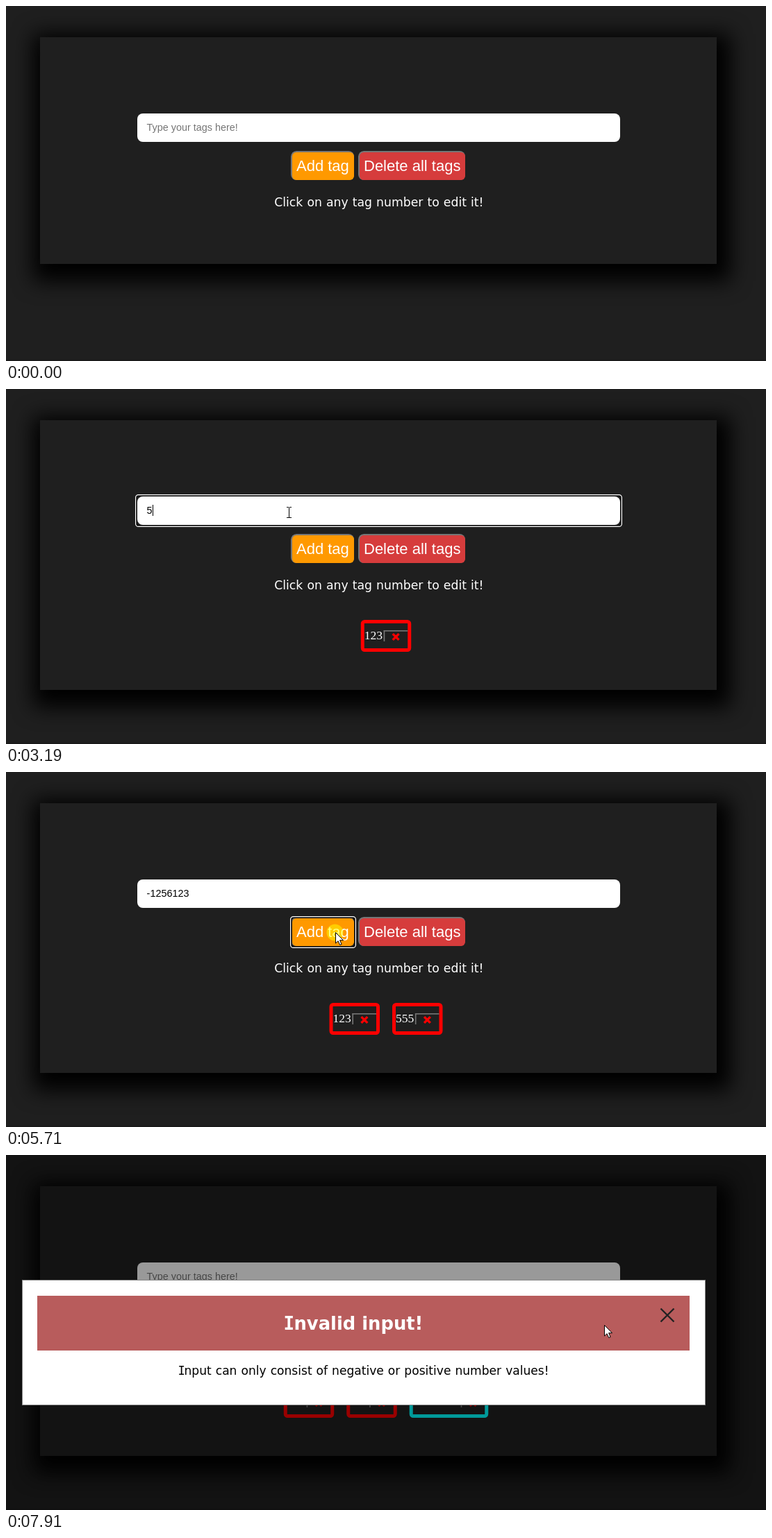
Animation of 1094x512 px, one loop 7990 ms. Source, as an HTML page with a canvas:

```html
<!DOCTYPE html>
<html lang="en">
<head>
<meta charset="utf-8">
<title>Tag input</title>
<style>
  html, body { margin: 0; width: 100%; height: 100%; overflow: hidden; background: #1f1f1f; }
  canvas { display: block; }
</style>
</head>
<body>
<canvas id="stage" width="1094" height="512"></canvas>
<script>
const ctx = document.getElementById('stage').getContext('2d');
const LOOP = 7990, STEP = 80;
const BG = '#1f1f1f', GREY = '#767676';
const SANS = '"Liberation Sans", Arial, sans-serif';
const WIDE = '"DejaVu Sans", Verdana, sans-serif';
const MONO = '"DejaVu Sans Mono", monospace';
const SERIF = '"Liberation Serif", "Times New Roman", serif';

// Timeline: [start, value]
const typed = [
  [0, ''], [1850, '1'], [2010, '12'], [2170, '123'], [2720, ''],
  [3190, '5'], [3270, '55'], [3350, '555'], [3750, ''],
  [4680, '-'], [4830, '-12'], [4990, '-1256'], [5150, '-125612'], [5310, '-1256123'], [5790, ''],
  [6340, '5'], [6810, '5g'], [6960, '5gg'], [7440, '']
];
const focus = [
  [0, ''], [1080, 'input'], [2640, 'add'], [3030, 'input'], [3670, 'add'],
  [4060, 'input'], [5710, 'add'], [6030, 'input'], [7360, 'add'], [7440, '']
];
const tags = [[2720, '123', '#f00'], [3750, '555', '#f00'], [5790, '-1256123', '#0ff']];
// Pointer moves: [start, steps, x, y]
const moves = [
  [130, 1, 879, 441], [210, 8, 338, 182], [2010, 6, 452, 244], [2800, 3, 407, 178],
  [3430, 3, 450, 230], [3830, 3, 419, 170], [5390, 4, 474, 231], [5870, 2, 461, 172],
  [7040, 4, 432, 222], [7590, 5, 861, 245]
];
// Mouse presses: [start, end]
const presses = [
  [1080, 1170], [2640, 2720], [3030, 3110], [3670, 3750],
  [4060, 4140], [5710, 5790], [6030, 6190], [7360, 7440]
];

const latest = (list, t) => list.filter(e => e[0] <= t).pop();

function rect(x, y, w, h, color) {
  ctx.fillStyle = color;
  ctx.fillRect(x, y, w, h);
}

function round(x, y, w, h, r, color) {
  ctx.fillStyle = color;
  ctx.beginPath();
  ctx.roundRect(x, y, w, h, r);
  ctx.fill();
}

function outline(x, y, w, h, r, line, color) {
  ctx.strokeStyle = color;
  ctx.lineWidth = line;
  ctx.beginPath();
  ctx.roundRect(x + line / 2, y + line / 2, w - line, h - line, r);
  ctx.stroke();
}

function text(str, x, y, font, color, spacing = 0) {
  ctx.font = font;
  ctx.fillStyle = color;
  ctx.wordSpacing = spacing + 'px';
  ctx.fillText(str, x, y);
}

function cross(x, y, r, line, color) {
  ctx.strokeStyle = color;
  ctx.lineWidth = line;
  ctx.beginPath();
  ctx.moveTo(x - r, y - r);
  ctx.lineTo(x + r, y + r);
  ctx.moveTo(x + r, y - r);
  ctx.lineTo(x - r, y + r);
  ctx.stroke();
}

function ring(x, y, w, h) {
  outline(x, y, w, h, 4, 2, '#101010');
  outline(x - 1, y - 1, w + 2, h + 2, 4, 1.2, '#fff');
}

function panel(h) {
  ctx.filter = 'blur(15px)';
  rect(39, 40, 1004, h + 30, '#000');
  ctx.filter = 'none';
  rect(49, 45, 974, h, BG);
}

function input(t, focused) {
  const [keyTime, value] = latest(typed, t);
  round(189, 155, 695, 41, 8, '#fff');
  if (focused) ring(187, 153, 699, 45);
  text(value || 'Type your tags here!', 202.6, 180, '14.4px ' + SANS, value ? '#000' : '#757575');
  const since = t - Math.max(keyTime, latest(focus, t)[0]);
  if (focused && since % 1070 < 535) {
    const end = value ? ctx.measureText(value).width : 0;
    rect(Math.round(202.6 + end), 167, 1, 16, '#000');
  }
}

function button(label, x, w, color, focused) {
  ctx.save();
  ctx.beginPath();
  ctx.roundRect(x, 209, w, 44, 8);
  ctx.clip();
  round(x, 209, w - 2, 42, 8, GREY);
  ctx.restore();
  round(x + 2, 211, w - 4, 40, 6, color);
  if (focused) ring(x, 209, w, 44);
  text(label, x + 8, 238, '22px ' + SANS, '#fff');
}

function tagRow(t) {
  const shown = tags.filter(tag => tag[0] <= t);
  const font = '17.6px ' + SERIF, gap = 18;
  ctx.font = font;
  const widths = shown.map(tag => ctx.measureText(tag[1]).width);
  const total = widths.reduce((sum, w) => sum + w + 46.1 + gap, -gap);
  let x = 547 - total / 2;
  shown.forEach(([, label, color], i) => {
    const w = widths[i], left = x + w + 6.5;
    outline(x, 333, w + 46.1, 46, 3, 5, color);
    text(label, x + 5, 361, font, '#fff');
    rect(left, 348, x + w + 41.1 - left, 1.6, GREY);
    rect(left, 348, 1.6, 16, GREY);
    cross(left + 17.5, 357.5, 4.4, 3.4, '#f00');
    x += w + 46.1 + gap;
  });
}

function modal() {
  rect(0, 0, 1094, 512, 'rgba(0,0,0,.4)');
  rect(23, 180, 984, 181, '#888');
  rect(24, 181, 982, 179, '#fff');
  rect(45, 203, 939, 79, '#b85c5c');
  // Slab-shaped capital I comes from the monospaced face
  text('I', 399.5, 252, 'bold 25.8px ' + MONO, '#fff');
  text('nvalid input!', 414.5, 252, 'bold 25.8px ' + WIDE, '#fff');
  text('I', 247.6, 317, '17.1px ' + MONO, '#000');
  text('nput can only consist of negative or positive number values!',
    256.5, 317, '17.1px ' + WIDE, '#000', 0.58);
  cross(952, 231, 9.5, 2.4, '#222');
}

function pointerAt(t) {
  let x = 879, y = 441;
  for (const [start, steps, toX, toY] of moves) {
    if (t < start) break;
    const p = Math.min(1, (Math.floor((t - start) / STEP) + 1) / steps);
    const e = (1 - Math.cos(Math.PI * p)) / 2;
    x += (toX - x) * e;
    y += (toY - y) * e;
  }
  return [x, y];
}

function beam(x, y) {
  x = Math.round(x);
  y = Math.round(y);
  rect(x, y - 7, 1, 15, '#000');
  for (const end of [y - 8, y + 7]) {
    rect(x - 3, end, 3, 1, '#000');
    rect(x + 1, end, 3, 1, '#000');
  }
}

function arrow(x, y) {
  ctx.save();
  ctx.translate(x + 0.5, y + 0.5);
  ctx.beginPath();
  for (const [px, py] of [[0, 0], [0, 15.5], [3.6, 12.2], [6.2, 18], [8.6, 17], [6.1, 11.2], [11, 11.2]]) {
    ctx.lineTo(px, py);
  }
  ctx.closePath();
  ctx.fillStyle = '#fff';
  ctx.fill();
  ctx.strokeStyle = '#000';
  ctx.lineWidth = 1;
  ctx.stroke();
  ctx.restore();
}

function pointer(t, modalOpen) {
  if (t < 130) return;
  const [x, y] = pointerAt(t);
  if (presses.some(([from, to]) => t >= from && t < to)) {
    round(x - 12.5, y - 11.5, 24, 24, 12, 'rgba(255,255,0,.5)');
  }
  const inField = x > 189 && x < 884 && y > 155 && y < 196;
  (inField && !modalOpen ? beam : arrow)(x, y);
}

function draw(t) {
  const active = latest(focus, t)[1];
  const modalOpen = t >= 7440;
  rect(0, 0, 1094, 512, BG);
  panel(t < tags[0][0] ? 327 : 389);
  rect(0, 510, 1094, 2, '#1a1a1a');
  input(t, active === 'input');
  button('Add tag', 410, 93, '#ff9900', active === 'add');
  button('Delete all tags', 507, 156, '#d63c3c', false);
  text('Click on any tag number to edit it!', 386.2, 289, '17.25px ' + WIDE, '#fff', 0.59);
  tagRow(t);
  if (modalOpen) modal();
  pointer(t, modalOpen);
}

const begin = performance.now();
function frame() {
  draw((performance.now() - begin) % LOOP);
  requestAnimationFrame(frame);
}
frame();
</script>
</body>
</html>
```
